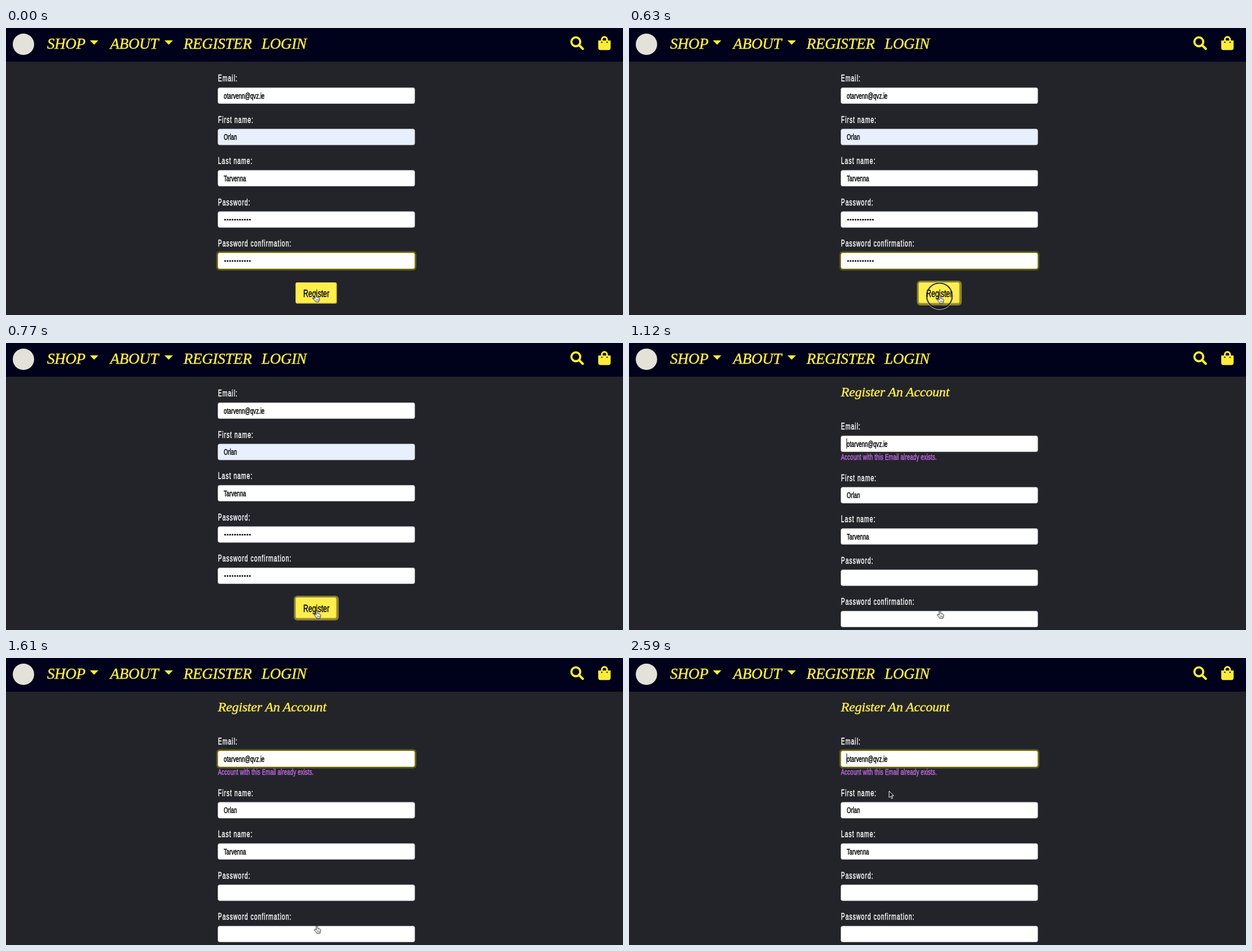
Write an HTML page that moves like this. It is 1096 px wide and 511 px high and loops after 2660 ms.

```html
<!DOCTYPE html>
<html lang="en">
<head>
<meta charset="utf-8">
<title>Register</title>
<style>
  html, body { margin: 0; width: 100%; height: 100%; overflow: hidden; background: #232429; }
  svg { display: block; width: 1096px; height: 511px; }
  text { white-space: pre; }
  .sans { font-family: "Liberation Sans", Arial, sans-serif; stroke-width: .5px; }
  .label { font-size: 15.8px; letter-spacing: 1.5px; fill: #fff; stroke: #fff; }
  .value { font-size: 14.5px; fill: #000; stroke: #000; }
  .error { font-size: 14.5px; letter-spacing: .28px; fill: #c269e6; stroke: #c269e6; }
  .submit { font-size: 18.8px; fill: #0b0b0b; stroke: #0b0b0b; }
  .script { font-family: "Liberation Serif", "Times New Roman", serif; font-style: italic;
            fill: #fdec45; stroke: #fdec45; stroke-width: .5px; }
  .nav { font-size: 27px; letter-spacing: -.25px; }
  .title { font-size: 24px; letter-spacing: -.2px; }
</style>
</head>
<body>
<svg id="stage" viewBox="0 0 1096 511"></svg>
<script>
const LOOP = 2660;
const CONDENSED = .664;
const YELLOW = '#ffed35';
const NAV = '#00021b';
const X = 376.2, W = 350.2, H = 29;

const sans = (x, y, cls, s) =>
  `<text class="sans ${cls}" transform="translate(${x} ${y}) scale(${CONDENSED} 1)">${s}</text>`;
const script = (x, y, cls, s) => `<text class="script ${cls}" x="${x}" y="${y}">${s}</text>`;
const box = (x, y, w, h, r, attrs) =>
  `<rect x="${x}" y="${y}" width="${w}" height="${h}" rx="${r}" ${attrs}/>`;
const dropdown = x => `<path d="M${x} 22h15l-7.5 7.8z" fill="${YELLOW}"/>`;
const caret = (id, x, y) => `<rect id="${id}" x="${x}" y="${y}" width="1" height="18" fill="#000"/>`;

const dots = y => Array.from({ length: 11 }, (_, i) =>
  `<circle cx="${389.2 + i * 4.4}" cy="${y + 14.7}" r="1.55"/>`).join('');

const field = (y, label, content = '', fill = '#fff') =>
  sans(376.5, y - 10.8, 'label', label) +
  box(X + .4, y + .4, W - .8, H - .8, 3, `fill="${fill}" stroke="#d6dbe0" stroke-width=".8"`) + content;

const value = (y, s) => sans(386.8, y + 19.7, 'value', s);

const focus = (id, y) => `<g id="${id}" fill="none">` +
  box(X - 1.2, y - 1.2, W + 2.4, H + 2.4, 4.5, 'stroke="#5d5724" stroke-width="3"') +
  box(X + .5, y + .5, W - 1, H - 1, 3, 'stroke="#e6d74c"') + '</g>';

const EMAIL = 'otarvenn@qvz.ie', FIRST = 'Orlan', LAST = 'Tarvenna';

const header = box(0, 0, 1096, 60, 0, `fill="${NAV}"`) +
  '<circle cx="31" cy="29" r="19" fill="#e4e1d9"/>' +
  script(73, 36.5, 'nav', 'SHOP') + dropdown(149) +
  script(185, 36.5, 'nav', 'ABOUT') + dropdown(281.5) +
  script(315.5, 36.5, 'nav', 'REGISTER') +
  script(454, 36.5, 'nav', 'LOGIN') +
  `<g fill="none" stroke="${YELLOW}">
    <circle cx="1012.2" cy="24.6" r="7.9" stroke-width="3.8"/>
    <path d="M1018 30.4l6.5 6.5" stroke-width="4.2" stroke-linecap="round"/>
    <path d="M1058.3 24v-3.4a4.7 4.7 0 0 1 9.4 0v3.4" stroke-width="3.1"/>
  </g>
  <path d="M1052 22.2h22v13.1a3.9 3.9 0 0 1-3.9 3.9h-14.2a3.9 3.9 0 0 1-3.9-3.9z" fill="${YELLOW}"/>
  <g fill="${NAV}"><circle cx="1058.3" cy="25.4" r="1.2"/><circle cx="1067.7" cy="25.4" r="1.2"/></g>`;

const button =
  box(513.1, 451.6, 76.3, 40.8, 4.5, 'id="buttonRing" fill="none" stroke="#898036" stroke-width="3.4"') +
  box(514.5, 453, 73.5, 38, 3, 'fill="#a99c2c"') +
  box(514.5, 453, 72, 36.5, 2.5, 'fill="#ffee4c"') +
  sans(528, 479, 'submit', 'Register');

const filled = '<g id="filled">' +
  field(106, 'Email:', value(106, EMAIL)) +
  field(179.5, 'First name:', value(179.5, FIRST), '#e8f0fe') +
  field(253, 'Last name:', value(253, LAST)) +
  field(326.5, 'Password:', dots(326.5)) +
  field(400, 'Password confirmation:', dots(400)) +
  focus('confirmFocus', 400) + caret('confirmCaret', 434.5, 405) + button + '</g>';

const rejected = '<g id="rejected">' +
  script(376.5, 95, 'title', 'Register An Account') +
  field(165, 'Email:', value(165, EMAIL)) +
  focus('emailFocus', 165) + caret('emailCaret', 386.3, 170) +
  sans(376.5, 208, 'error', 'Account with this Email already exists.') +
  field(256.5, 'First name:', value(256.5, FIRST)) +
  field(330, 'Last name:', value(330, LAST)) +
  field(403.5, 'Password:') +
  field(477, 'Password confirmation:') + '</g>';

const pointers = `
  <g id="ripple" fill="none">
    <circle r="22.8" stroke="#08080c" stroke-width="1.8"/>
    <circle r="24.2" stroke="#d8d8d8" stroke-width="1"/>
  </g>
  <g id="hand" stroke="#111" stroke-width="1" stroke-linejoin="round">
    <path fill="#fff"
      d="M-1.4 .8a1.3 1.3 0 0 1 2.6 0V4.5l4 .9q1.6 .5 1.4 2.2l-.6 3-1 2.4h-5.2l-1.6-2.4-3-3.4q-.3-1.6 1.2-1.4l2.2 1.2z"/>
    <path d="M.6 8v3m1.8-3v3m1.8-3v3" stroke-width=".6"/>
  </g>
  <path id="arrow" fill="#111" stroke="#fff" stroke-width="1" stroke-linejoin="round"
    d="M0 0v11.6l2.7-2.5 1.9 4.3 1.9-.8-1.9-4.2h3.7z"/>`;

document.getElementById('stage').innerHTML = header + filled + rejected + pointers;

// Each step is [ms, value]; a value holds until the next step.
function track(id, prop, steps) {
  const frames = steps.map(([ms, v]) => ({ offset: ms / LOOP, [prop]: v, easing: 'steps(1, end)' }));
  frames.push({ offset: 1, [prop]: steps[steps.length - 1][1] });
  document.getElementById(id).animate(frames, { duration: LOOP, iterations: Infinity });
}
const at = (x, y, s = 1) => `translate(${x}px, ${y}px) scale(${s})`;

track('filled', 'opacity', [[0, 1], [1120, 0]]);
track('rejected', 'opacity', [[0, 0], [1120, 1]]);
track('confirmCaret', 'opacity', [[0, 0], [350, 1], [560, 0]]);
track('confirmFocus', 'opacity', [[0, 1], [630, .9], [700, .4], [770, 0]]);
track('buttonRing', 'opacity', [[0, 0], [560, .5], [630, 1]]);
track('emailFocus', 'opacity', [[0, 0], [1120, .1], [1190, .5], [1260, .85], [1330, 1]]);
track('emailCaret', 'opacity', [[0, 1], [1610, 0], [2170, 1]]);
track('ripple', 'opacity', [[0, 0], [490, .6], [560, 1], [700, .5], [770, 0]]);
track('ripple', 'transform', [[0, at(551.5, 477, .5)], [560, at(551.5, 477, .8)], [630, at(551.5, 477)]]);
track('hand', 'transform', [[0, at(550.3, 474.5)], [70, at(551.3, 476)], [140, at(552.4, 477.3)]]);
track('hand', 'opacity', [[0, 1], [2520, 0]]);
track('arrow', 'opacity', [[0, 0], [2520, 1]]);
track('arrow', 'transform', [[0, at(508, 372)], [2590, at(462, 236.8)]]);
</script>
</body>
</html>
```
